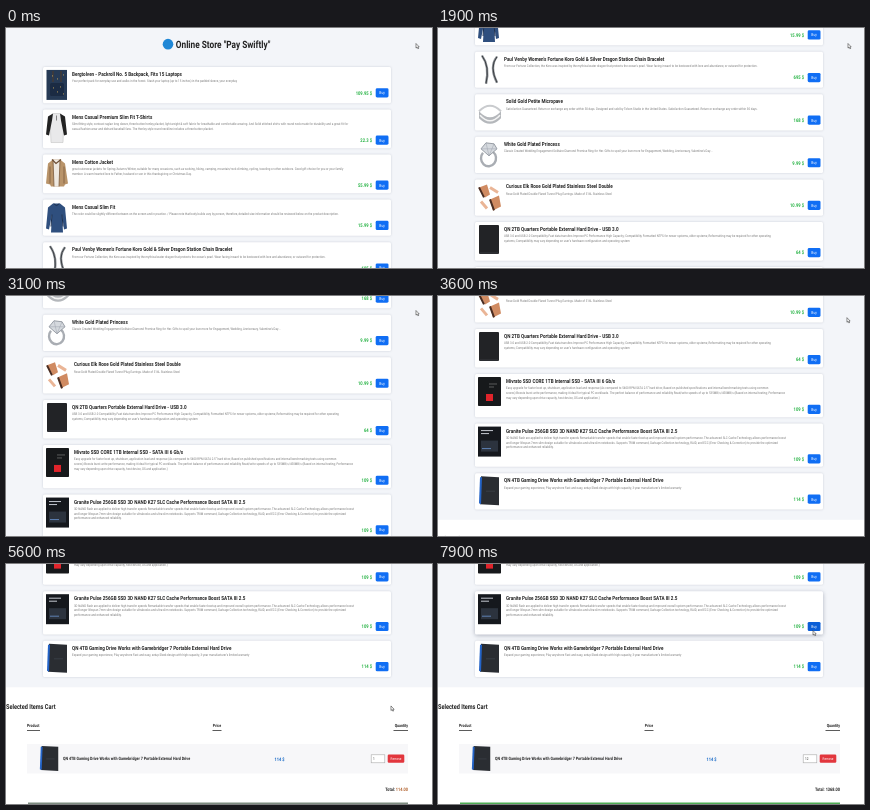
Recreate the animation shown at these times as an HTML page. Size 426 by 240 pixels, loop 8 s.

```html
<!DOCTYPE html>
<html lang="en">
<head>
<meta charset="utf-8">
<title>Online store</title>
<style>
html, body { margin: 0; width: 100%; height: 100%; overflow: hidden; background: #fff; }
svg { display: block; width: 100vw; height: 100vh; }
text { font-family: Roboto, "Open Sans", sans-serif; text-rendering: geometricPrecision; white-space: pre; }
.bold { font-weight: 700; }
.card { fill: #fff; filter: drop-shadow(0 .8px 1.3px rgba(50, 60, 85, .2)); }
.card.hot { filter: drop-shadow(0 1.2px 2px rgba(50, 60, 85, .36)); }
.buy { fill: #106ef4; }
.buy.hot { fill: #0b5ed7; }
</style>
</head>
<body>
<svg viewBox="0 0 426 240" preserveAspectRatio="none">
  <g id="page"></g>
  <path id="cursor" d="M0 0V4.6L1.1 3.7L1.9 5.3L2.6 5L1.9 3.4H3.2Z" fill="#fff" stroke="#333" stroke-width=".55"/>
</svg>
<script>
const LOOP = 8;
const CONDENSE = 0.82; // one width for the whole condensed face
const $ = id => document.getElementById(id);

const rect = (x, y, w, h, fill, more = '') =>
  `<rect x="${x}" y="${y}" width="${w}" height="${h}" fill="${fill}" ${more}/>`;
const path = (d, fill, stroke = 'none', width = 1) =>
  `<path d="${d}" fill="${fill}" stroke="${stroke}" stroke-width="${width}"/>`;
// y is the middle of the capitals
const text = (x, y, size, str, fill = '#222', cls = 'bold', anchor = 'start', more = '') =>
  `<text ${more} class="${cls}" fill="${fill}" font-size="${size}" text-anchor="${anchor}"
    transform="translate(${x} ${y + size * .355}) scale(${CONDENSE} 1)">${str.replace(/&/g, '&amp;')}</text>`;

// Product pictures, each in a 24 x 30 box
const art = {
  backpack: rect(1.5, 0, 20.500, 30, '#263a55') + rect(5, 13, 14, 13, '#1b2b43', 'rx="1.5"') +
    path('M8 1V12M16 1V12', 'none', '#4a3b30', 1.2) +
    path('M7 6h1M12 9h1M18 5h1M8 18h1M15 17h1M12 22h1M18 24h1', 'none', '#b59b5b', 1),
  raglan: path('M8 1h7l4 4l-1 25H6L5 5Z', '#e9e9ea', '#bbb', .5) +
    path('M8 1L3 4L1 22l3 1L7 8ZM15 1l5 3l2 18l-3 1L16 8Z', '#222') +
    path('M11.5 3v5', 'none', '#555', .7),
  jacket: path('M8 2L3 6L1 26l4 1l1 2h13l1-2l3-1L20 6L15 2Z', '#b9946a') +
    path('M8 2h7l-1 27H9Z', '#eee8e0') + path('M8 2l1 27M15 2l-1 27M5 9v17M19 9v17', 'none', '#7b5b3d', .8) +
    path('M7 2l4 4l5-4', 'none', '#6b4c33', 1.2),
  shirt: path('M8 1h7l5 4l2 21l-3 1l-2-15l1 18H6l1-18L4 27l-3-1L3 5Z', '#2f4f7e') +
    path('M9 1q2.5 4 5 0M7 12L6 24M17 12l1 12', 'none', '#1c3050', 1),
  bracelet: path('M5 1Q13 12 9 29M20 2Q12 12 20 28', 'none', '#8d9196', 2.4) +
    path('M5 1Q13 12 9 29M20 2Q12 12 20 28', 'none', '#33363a', .9),
  band: path('M2 14Q13 3 24 14', 'none', '#c9cbce', 2) + path('M2 14Q13 26 24 14v7Q13 32 2 21Z', '#b4b7bb') +
    path('M3 18Q13 29 23 18', 'none', '#f4f4f4', 1.6),
  ring: path('M6 13a7.5 8 0 1 0 10-1', 'none', '#a9adb3', 2.4) + path('M4 9L9 3l8 1l3 5l-8 7Z', '#d5d9de', '#858b94', .8) +
    path('M4 9h16M9 3l3 13M17 4l-5 12', 'none', '#9ca3ac', .5),
  tunnels: path('M2 5l8-3l3 10l-5 3ZM13 17l9-4l2 11l-8 4Z', '#d08b62') +
    path('M2 5l5 10M13 17l4 11', 'none', '#4a2d22', 2) + path('M13 5l8 5M4 19l6 7', 'none', '#eab596', 3),
  drive: rect(2, 0, 20, 29, '#222326', 'rx="1"') + path('M3 28h18', 'none', '#44474d', .6),
  ssd: rect(1, 0, 23, 29, '#17191b', 'rx=".8"') + rect(9, 17, 7, 7, '#e0242b') + path('M12 7h8M12 10h5', 'none', '#777', .7),
  stick: rect(1, 0, 23, 30, '#15181d') + rect(4, 14, 17, 11, '#2c333e') +
    path('M4 4h12M4 7h8', 'none', '#c4c8d0', 1) + path('M5 22h9', 'none', '#5d80b3', 1),
  gaming: path('M4 0L22 1V29L3 28Z', '#2a2d32') + path('M3 1L2 27l2 1L5 1Z', '#2464c8') +
    path('M9 15h9', 'none', '#40454d', .7)
};

// [picture, title, price, title x, description lines]
const DRIVE = 'QN 4TB Gaming Drive Works with Gamebridger 7 Portable External Hard Drive';
const items = [
  ['backpack', 'Bergtolven - Packroll No. 5 Backpack, Fits 15 Laptops', '109.95', 66,
    ['Your perfect pack for everyday use and walks in the forest. Stash your laptop (up to 15 inches) in the padded sleeve, your everyday']],
  ['raglan', 'Mens Casual Premium Slim Fit T-Shirts', '22.3', 66,
    ['Slim-fitting style, contrast raglan long sleeve, three-button henley placket, light weight & soft fabric for breathable and comfortable wearing. And Solid stitched shirts with round neck made for durability and a great fit for',
      'casual fashion wear and diehard baseball fans. The Henley style round neckline includes a three-button placket.']],
  ['jacket', 'Mens Cotton Jacket', '55.99', 66,
    ['great outerwear jackets for Spring/Autumn/Winter, suitable for many occasions, such as working, hiking, camping, mountain/rock climbing, cycling, traveling or other outdoors. Good gift choice for you or your family',
      'member. A warm hearted love to Father, husband or son in this thanksgiving or Christmas Day.']],
  ['shirt', 'Mens Casual Slim Fit', '15.99', 66,
    ['The color could be slightly different between on the screen and in practice. / Please note that body builds vary by person, therefore, detailed size information should be reviewed below on the product description.']],
  ['bracelet', "Paul Venby Women's Fortune Koro Gold & Silver Dragon Station Chain Bracelet", '695', 66,
    ["From our Fortune Collection, the Koro was inspired by the mythical water dragon that protects the ocean's pearl. Wear facing inward to be bestowed with love and abundance, or outward for protection."]],
  ['band', 'Solid Gold Petite Micropave', '168', 68,
    ['Satisfaction Guaranteed. Return or exchange any order within 30 days. Designed and sold by Tolven Studio in the United States. Satisfaction Guaranteed. Return or exchange any order within 30 days.']],
  ['ring', 'White Gold Plated Princess', '9.99', 66,
    ["Classic Created Wedding Engagement Solitaire Diamond Promise Ring for Her. Gifts to spoil your love more for Engagement, Wedding, Anniversary, Valentine's Day..."]],
  ['tunnels', 'Curious Elk Rose Gold Plated Stainless Steel Double', '10.99', 68,
    ['Rose Gold Plated Double Flared Tunnel Plug Earrings. Made of 316L Stainless Steel']],
  ['drive', 'QN 2TB Quarters Portable External Hard Drive - USB 3.0', '64', 66,
    ['USB 3.0 and USB 2.0 Compatibility Fast data transfers Improve PC Performance High Capacity; Compatibility Formatted NTFS for newer systems, older systems; Reformatting may be required for other operating',
      'systems; Compatibility may vary depending on user’s hardware configuration and operating system']],
  ['ssd', 'Mivrato SSD CORE 1TB Internal SSD - SATA III 6 Gb/s', '109', 68,
    ['Easy upgrade for faster boot up, shutdown, application load and response (As compared to 5400 RPM SATA 2.5” hard drive; Based on published specifications and internal benchmarking tests using common',
      'scores) Boosts burst write performance, making it ideal for typical PC workloads. The perfect balance of performance and reliability Read/write speeds of up to 535MB/s/450MB/s (Based on internal testing; Performance',
      'may vary depending upon drive capacity, host device, OS and application.)']],
  ['stick', 'Granite Pulse 256GB SSD 3D NAND K27 SLC Cache Performance Boost SATA III 2.5', '109', 68,
    ['3D NAND flash are applied to deliver high transfer speeds Remarkable transfer speeds that enable faster bootup and improved overall system performance. The advanced SLC Cache Technology allows performance boost',
      'and longer lifespan 7mm slim design suitable for ultrabooks and ultra-slim notebooks. Supports TRIM command, Garbage Collection technology, RAID, and ECC (Error Checking & Correction) to provide the optimized',
      'performance and enhanced reliability.']],
  ['gaming', DRIVE, '114', 66,
    ['Expand your gaming experience, Play anywhere Fast and easy, setup Sleek design with high capacity, 3-year manufacturer’s limited warranty']]
];

// Card pitch and button offset by number of description lines
const PITCH = [0, 42.6, 45, 49.6], BUTTON = [0, 18.9, 23.6, 28.3];
const boxes = [];
let cardTop = 39;

function product([pic, title, price, x, lines]) {
  const mid = cardTop + 7, n = lines.length, by = mid + BUTTON[n], height = PITCH[n] - 6.4;
  boxes.push({ top: cardTop, bottom: cardTop + height, by });
  const out = rect(37, cardTop, 348, height, '#fff', 'rx="1.5" class="card"') +
    `<g transform="translate(39 ${mid - 4})">${art[pic]}</g>` +
    text(x, mid, 5.57, title) +
    lines.map((line, i) => text(x, mid + 7.2 + i * 4.6, 3.5, line, '#777', '')).join('') +
    text(366, by, 5, price + ' $', '#27b345', 'bold', 'end') +
    rect(369.7, by - 4.6, 12.8, 9.2, '#106ef4', 'rx="1.4" class="buy"') +
    text(376.1, by, 4.1, 'Buy', '#fff', '', 'middle');
  cardTop += PITCH[n];
  return out;
}

const heading = (x, label, anchor, x0, x1) =>
  text(x, 613, 4.3, label, '#222', 'bold', anchor) + rect(x0, 618, x1 - x0, .8, '#333');

$('page').innerHTML =
  rect(0, 0, 426, 575.5, '#f3f5f9') +
  '<circle cx="162" cy="16.2" r="5.3" fill="#1f87d6"/>' +
  text(169.8, 16.3, 10.1, 'Online Store "Pay Swiftly"') +
  items.map(product).join('') +
  rect(0, 575.5, 426, 200, '#fff') +
  text(0, 594.5, 6.8, 'Selected Items Cart') +
  heading(21, 'Product', 'start', 21, 34) +
  heading(211, 'Price', 'middle', 206.5, 215.5) +
  heading(402, 'Quantity', 'end', 387.5, 402) +
  '<g id="cart">' +
    rect(21, 632, 381, 29.5, '#f7f7f9') +
    `<g transform="translate(32 634) scale(.92 .86)">${art.gaming}</g>` +
    text(57, 646.8, 4.45, DRIVE) +
    text(273.5, 646.8, 4.8, '114 $', '#1769c6', 'bold', 'middle') +
    rect(365.2, 642.8, 13.6, 8, '#fff', 'stroke="#aaa" stroke-width=".6"') +
    text(367, 646.8, 3.8, '1', '#333', '', 'start', 'id="count"') +
    rect(381.7, 642.6, 16.6, 8.2, '#e2363d', 'rx="1.2"') +
    text(390, 646.8, 3.7, 'Remove', '#fff', '', 'middle') +
    text(402, 677.3, 4.7, 'Total: <tspan id="total"></tspan>', '#222', 'bold', 'end') +
    rect(22, 690.5, 380, 10, '#4fae55', 'id="order"') +
  '</g>';

// Piecewise linear value of the rows [time, ...values]
function at(t, rows) {
  let i = 1;
  while (i < rows.length - 1 && t > rows[i][0]) i++;
  const [a, b] = [rows[i - 1], rows[i]];
  const k = Math.min(1, Math.max(0, (t - a[0]) / (b[0] - a[0])));
  return a.slice(1).map((v, j) => v + (b[j + 1] - v) * k);
}

const scrollPath = [[0, 0], [1, 69], [1.9, 190.5], [3.1, 280.5], [3.6, 351.5], [4, 395], [4.6, 395], [5.4, 452]];
const cursorPath = [[0, 410, 15.5], [2.7, 410, 15.5], [3.1, 410, 14.5], [3.6, 409, 21.5], [4.5, 376, 157], [4.7, 376, 157],
  [5.6, 385, 141.8], [6, 371, 194], [6.4, 371, 194], [6.9, 377, 88], [7, 377, 88], [7.9, 375, 66.5]];
const cards = document.querySelectorAll('.card'), buttons = document.querySelectorAll('.buy');

function draw(t) {
  const [scroll] = at(t, scrollPath), [x, y] = at(t, cursorPath);
  $('page').setAttribute('transform', `translate(0 ${-scroll})`);
  $('cursor').setAttribute('transform', `translate(${x} ${y})`);
  const py = y + scroll;
  boxes.forEach((b, i) => {
    const inside = x > 37 && x < 385 && py > b.top && py < b.bottom;
    cards[i].classList.toggle('hot', inside);
    buttons[i].classList.toggle('hot', inside && x > 369 && x < 383 && Math.abs(py - b.by) < 5);
  });
  const count = t < 6.4 ? 1 : 12;
  $('cart').style.display = t < 4.6 ? 'none' : '';
  $('count').textContent = count;
  $('total').textContent = (114 * count).toFixed(2);
  $('total').setAttribute('fill', count > 1 ? '#222' : '#b0602c');
  $('order').setAttribute('fill', count > 1 ? '#4fae55' : '#7d8c80');
}

function frame() {
  draw(performance.now() / 1000 % LOOP);
  requestAnimationFrame(frame);
}
frame();
</script>
</body>
</html>
```
